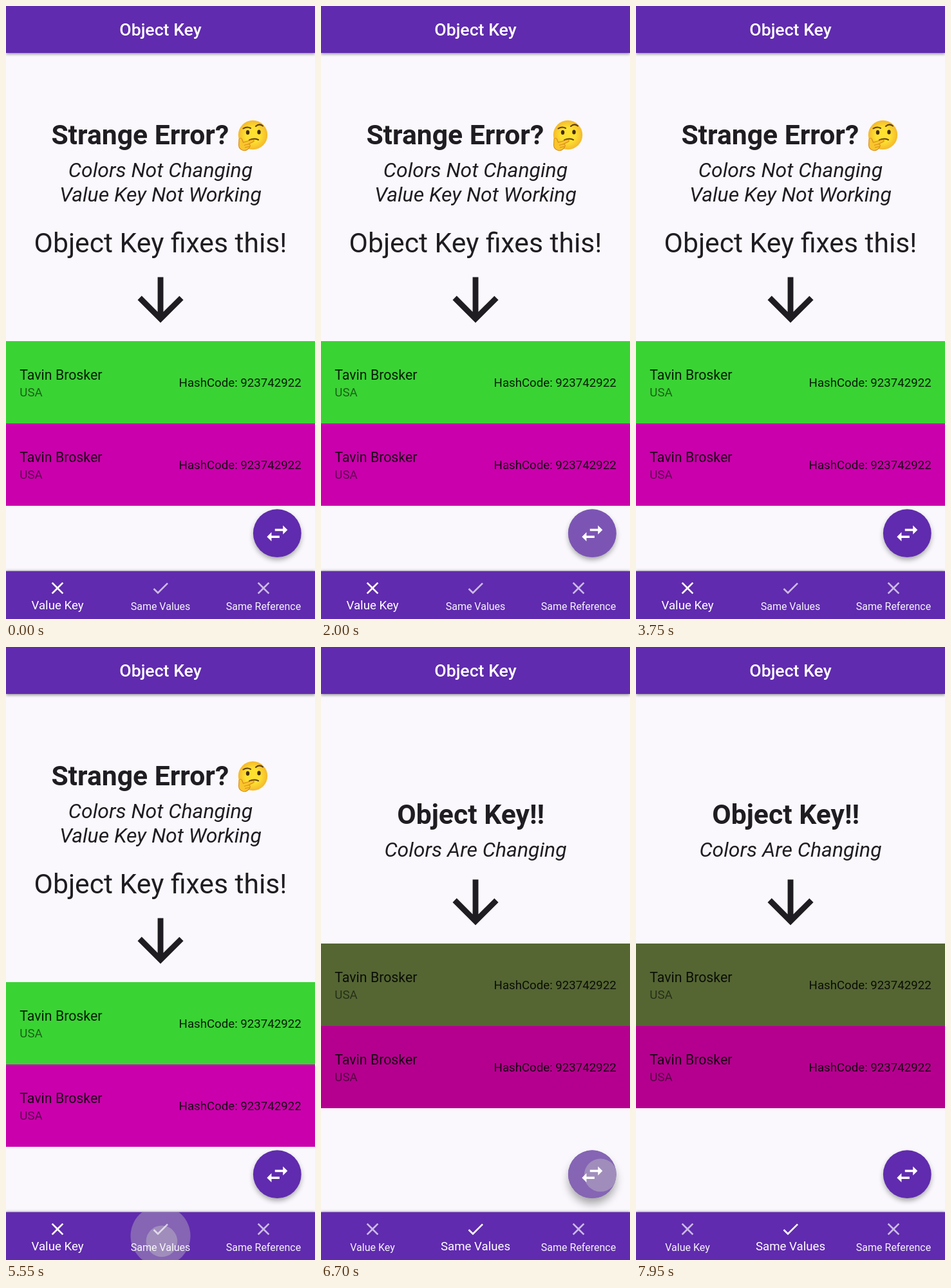
These frames come from a looping animation (480 by 953 pixels, 8000 ms). An HTML page:

```html
<!DOCTYPE html>
<html lang="en">
<head>
<meta charset="utf-8">
<title>Object Key</title>
<style>
  html, body { margin: 0; width: 100%; height: 100%; overflow: hidden; background: #faf8fc; }
  svg { display: block; width: 100vw; height: 100vh; font-family: Roboto, sans-serif; }
  .ink { fill: #1f1c22; }
  .big { font-size: 42.67px; }
  .bold { font-weight: 700; }
  .note { font-size: 32px; font-style: italic; text-anchor: middle; }
  .mid { text-anchor: middle; }
  .name { font-size: 21.33px; fill-opacity: .87; }
  .land { font-size: 18.67px; fill-opacity: .54; }
  .hash { font-size: 18.67px; fill-opacity: .87; text-anchor: end; }
  .label { font-size: 18.67px; fill: #fff; text-anchor: middle; }
</style>
</head>
<body>
<svg viewBox="0 0 480 953" preserveAspectRatio="none">
  <defs>
    <clipPath id="fabClip"><circle cx="421.3" cy="819.7" r="37.4"/></clipPath>
    <clipPath id="navClip"><rect y="878.5" width="480" height="75"/></clipPath>
    <filter id="soft" x="-50%" y="-50%" width="200%" height="200%"><feGaussianBlur stdDeviation="2.2"/></filter>
    <filter id="fabSoft" x="-50%" y="-50%" width="200%" height="200%"><feGaussianBlur id="fabBlur" stdDeviation="4"/></filter>
    <radialGradient id="skin"><stop offset=".5" stop-color="#fde030"/><stop offset="1" stop-color="#f5b92e"/></radialGradient>
    <path id="cross" d="M19 6.41L17.59 5 12 10.59 6.41 5 5 6.41 10.59 12 5 17.59 6.41 19 12 13.41 17.59 19 19 17.59 13.41 12z"/>
    <path id="check" d="M9 16.17L4.83 12l-1.42 1.41L9 19 21 7l-1.41-1.41z"/>
    <path id="swap" d="M6.99 11L3 15l3.99 4v-3H14v-2H6.99v-3zM21 9l-3.99-4v3H10v2h7.01v3L21 9z"/>
    <path id="down" d="M20 12l-1.41-1.41L13 16.17V4h-2v12.17l-5.58-5.59L4 12l8 8 8-8z"/>
  </defs>

  <rect width="480" height="953" fill="#faf8fc"/>

  <g id="errorPage" class="ink">
    <text class="big bold" x="70.4" y="215">Strange Error?</text>
    <g id="thinker">
      <circle cx="383.5" cy="200.5" r="22.7" fill="url(#skin)"/>
      <g fill="#422b0d">
        <ellipse cx="375.5" cy="196.5" rx="2.7" ry="3.5"/>
        <ellipse cx="393" cy="196" rx="2.7" ry="3.5"/>
      </g>
      <g fill="none" stroke="#5a3c16" stroke-width="2" stroke-linecap="round">
        <path d="M368.5 190.5q6-3.5 11.5-.5M388 187q5.500-5 11-.5M378 208.500q7-3.500 14-.5"/>
      </g>
      <path d="M362 207q2.500-3 4.500 0l2 5 13.500-4q4-.5 3 2.500l-8 4q3 1 2 3.500t-2.500 4q-4 3.500-8 2.500-6.500-1.500-7-8z"
        fill="#f9c52c" stroke="#d98b1c" stroke-width="1.100"/>
      <path d="M370 216.500l7.500-2M371 220l7-1.500" fill="none" stroke="#d98b1c"/>
    </g>
    <text class="note" x="240" y="266">Colors Not Changing</text>
    <text class="note" x="240" y="303.500">Value Key Not Working</text>
    <text class="big mid" x="240" y="383">Object Key fixes this!</text>
  </g>

  <g id="fixedPage" class="ink">
    <text class="big bold" x="118.300" y="275">Object Key!!</text>
    <text class="note" x="240" y="326">Colors Are Changing</text>
  </g>

  <g id="list">
    <use href="#down" class="ink" transform="translate(186.700 403.600) scale(4.444)"/>
    <g id="tiles"></g>
  </g>

  <rect y="60" width="480" height="15" fill="#000" opacity=".38" filter="url(#soft)"/>
  <rect width="480" height="73" fill="#602bae"/>
  <text class="mid" x="240" y="46" font-size="26.670" font-weight="500" fill="#fff">Object Key</text>

  <circle id="fabShadow" cx="421.300" r="36.500" fill="#000" filter="url(#fabSoft)"/>
  <circle cx="421.300" cy="819.700" r="37.400" fill="#602bae"/>
  <g id="fabInk" clip-path="url(#fabClip)"></g>
  <use href="#swap" fill="#fff" transform="translate(400 798.500) scale(1.778)"/>

  <rect y="878" width="480" height="20" fill="#000" opacity=".3" filter="url(#soft)"/>
  <rect y="878.500" width="480" height="75" fill="#602bae"/>
  <g id="navInk" clip-path="url(#navClip)"></g>
  <g id="nav"></g>
</svg>
<script>
const LOOP = 8000, PAGE_AT = 5600, SWAPS = [6850, 7550];
const FAB = { x: 421.3, y: 819.7, r: 37.4, reach: 75 };
const TAB = { x: 240, y: 915.5, r: 46.5, reach: 46.5 };
const fabPresses = [
  { at: 850, up: 1780, x: 443, y: 829, grow: 1100 },
  { at: 2130, up: 3390, x: 441, y: 827, grow: 900 },
  { at: 6240, up: 6850, x: 441, y: 822, grow: 1350 },
  { at: 7190, up: 7550, x: 441, y: 822, grow: 1200 },
];
const tabPresses = [{ at: 4740, up: 5585, x: 244, y: 933, grow: 1550 }];

const $ = id => document.getElementById(id);
const clamp = v => Math.min(1, Math.max(0, v));
const mix = (a, b, k) => a + (b - a) * k;
const smooth = k => k * k * (3 - 2 * k);

function add(parent, tag, attrs, text = '') {
  const el = document.createElementNS('http://www.w3.org/2000/svg', tag);
  for (const key in attrs) el.setAttribute(key, attrs[key]);
  el.textContent = text;
  parent.append(el);
  return el;
}
function set(el, attrs) {
  for (const key in attrs) el.setAttribute(key, attrs[key]);
}

const tiles = [521, 649].map(y => {
  const rect = add($('tiles'), 'rect', { y, width: 480, height: 128 });
  add($('tiles'), 'text', { class: 'name', x: 21.3, y: y + 59.5 }, 'Tavin Brosker');
  add($('tiles'), 'text', { class: 'land', x: 21.3, y: y + 86 }, 'USA');
  add($('tiles'), 'text', { class: 'hash', x: 458.7, y: y + 71 }, 'HashCode: 923742922');
  return rect;
});

const tabs = [['Value Key', 'cross'], ['Same Values', 'check'], ['Same Reference', 'cross']].map(([label, icon], i) => {
  const x = 80 + 160 * i;
  return {
    x,
    icon: add($('nav'), 'use', { href: '#' + icon, fill: '#fff', transform: `translate(${x - 16} 889) scale(1.333)` }),
    label: add($('nav'), 'text', { class: 'label', y: -4.7 }, label),
  };
});

function makeInk(group, spot) {
  return {
    spot,
    glow: add(group, 'circle', { cx: spot.x, cy: spot.y, r: spot.r, fill: '#bcbcbc' }),
    splash: add(group, 'circle', { fill: '#c8c8c8' }),
  };
}
const fabInk = makeInk($('fabInk'), FAB);
const tabInk = makeInk($('navInk'), TAB);

function drawInk({ spot, glow, splash }, presses, t) {
  const p = presses.find(q => t >= q.at && t < q.up + 350);
  const alpha = p ? 0.4 * clamp((t - p.at) / 150) * (1 - clamp((t - p.up) / 350)) : 0;
  set(glow, { opacity: alpha });
  set(splash, { opacity: alpha });
  if (!p) return;
  // The splash grows slowly while held, then fills at once on release.
  const held = (Math.min(t, p.up) - p.at) / p.grow;
  const g = clamp(held + Math.max(0, t - p.up) / 80);
  set(splash, { cx: mix(p.x, spot.x, g), cy: mix(p.y, spot.y, g), r: spot.reach * g });
}

function raised(t) {
  return Math.max(...fabPresses.map(p => smooth(clamp((t - p.at) / 200)) * (1 - smooth(clamp((t - p.up) / 200)))));
}

function draw(t) {
  const second = t >= PAGE_AT;
  $('errorPage').style.display = second ? 'none' : '';
  $('fixedPage').style.display = second ? '' : 'none';
  set($('list'), { transform: `translate(0 ${second ? -60 : 0})` });

  const colors = second ? ['#556633', '#b5008f'] : ['#3ad334', '#ca00ac'];
  const swapped = second ? SWAPS.filter(s => t >= s).length % 2 : 0;
  tiles.forEach((tile, i) => set(tile, { fill: colors[i ^ swapped] }));

  drawInk(fabInk, fabPresses, t);
  drawInk(tabInk, tabPresses, t);

  const lift = raised(t);
  set($('fabShadow'), { cy: mix(824, 829, lift), opacity: mix(0.36, 0.34, lift) });
  set($('fabBlur'), { stdDeviation: mix(4, 7, lift) });

  const moved = smooth(clamp((t - PAGE_AT) / 200));
  [1 - moved, moved, 0].forEach((on, i) => {
    const tab = tabs[i];
    set(tab.icon, { opacity: mix(0.68, 1, on) });
    set(tab.label, {
      opacity: mix(0.95, 1, on),
      transform: `translate(${tab.x} 943) scale(${mix(12 / 14, 1, on)})`,
    });
  });
}

function tick() {
  draw(performance.now() % LOOP);
  requestAnimationFrame(tick);
}
tick();
</script>
</body>
</html>
```
